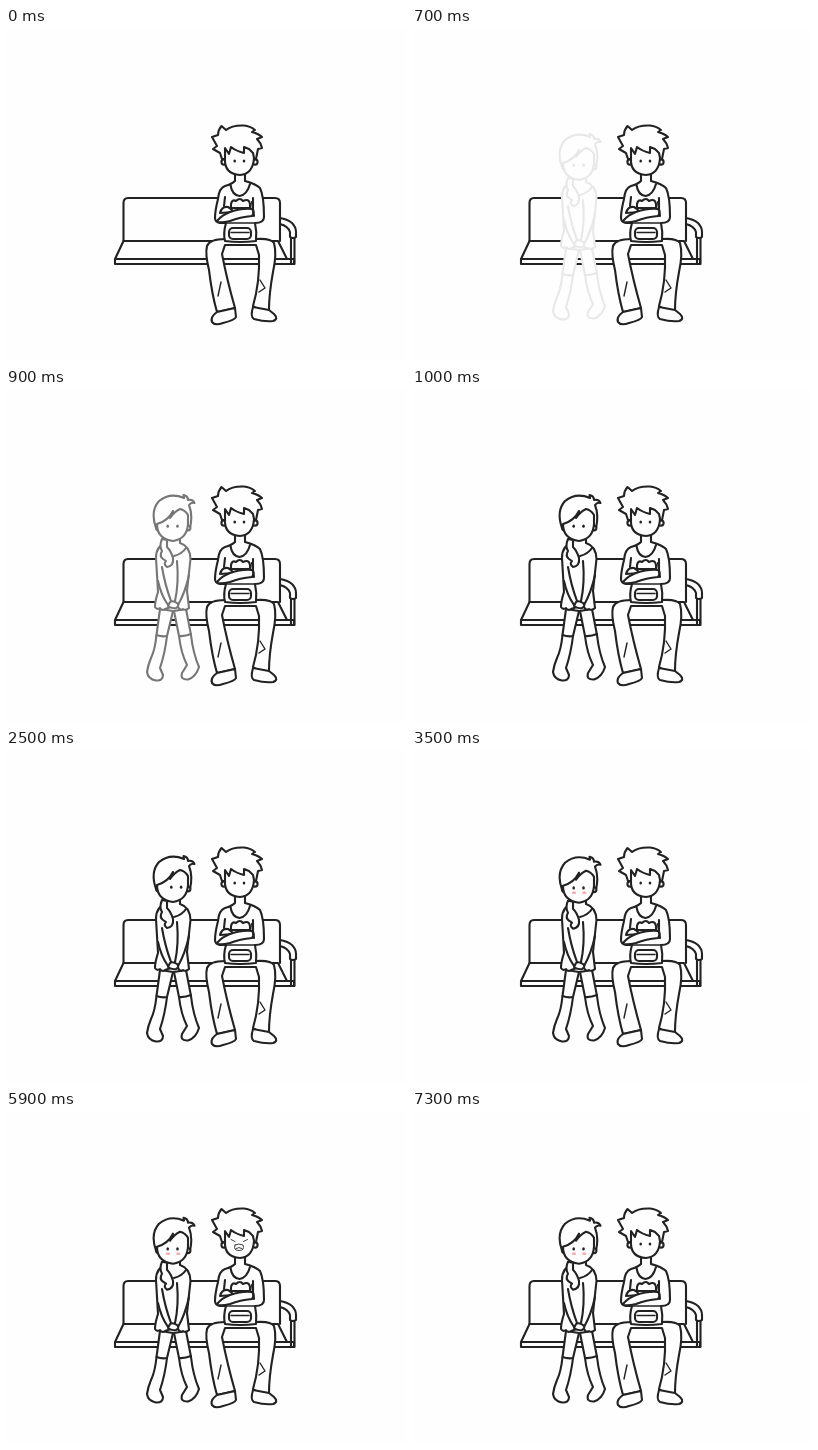
These frames come from a looping animation (400 px wide and 333 px high, 8 s). An HTML page:

```html
<!DOCTYPE html>
<html lang="en">
<head>
<meta charset="utf-8">
<title>Two on a bench</title>
<style>
  html, body { margin: 0; width: 100%; height: 100%; overflow: hidden; background: #fefefe; }
  svg { display: block; width: 100vw; height: 100vh; }
  .ink { fill: none; stroke: #222; stroke-width: 2.1; stroke-linecap: round; stroke-linejoin: round; }
  .solid { fill: #fefefe; }
  .thin { stroke-width: 1.4; }
  .fine { stroke: #444; stroke-width: 1; }
  .dot { fill: #222; stroke: none; }
  .blush { fill: #f9a9a9; stroke: none; }
</style>
</head>
<body>
<svg viewBox="0 0 400 333">
  <g class="ink" id="bench">
    <path d="M117.500 213V175Q117.500 170 122 170H269Q274 170 274 175V213"/>
    <path d="M117.500 213H272L281 231M117.500 213L109 231V236H288V231H109"/>
    <path d="M274 190Q281 191 286 195Q290 199 290 204V209Q287 211 284 209V204Q282 198 274 196"/>
    <path d="M285 210V236M288.500 210V236"/>
  </g>

  <g class="ink" id="girl">
    <path class="solid" d="M154 220L150.500 246Q149 261 145 269Q142 276 141 283Q142 290 150 291.500Q157 292 157 286L154 279Q159 264 161 247L167 222Z"/>
    <path class="solid" d="M168 222L173 247Q175 264 181 276L176 284Q174 291 182 290.500Q190 288 193 278Q187 264 185 246L180 220Z"/>
    <path d="M150.500 246Q156 248 161 247M173 247Q179 247.500 185 245"/>
    <path class="solid" d="M161 150V154Q150 156 150 169L152 203Q149 212 149 218Q151 221 154 219Q156 222 159 220L165 218H172Q174 222 177 220Q180 222 183 219Q182 210 181 202L184.500 170Q184 157 174 154V150Z"/>
    <path d="M156 178Q159 196 165 212M152 192Q155 206 162 216M171 172Q173 194 169 212M183 186Q179 204 172 216"/>
    <path class="solid" d="M164 213Q167 211 171 214Q174 217 170 219Q166 220 162 217Z"/>
    <path d="M168 167Q176 165 180 159"/>
    <g id="girlHead">
      <path class="solid" d="M156 150Q153 157 156 162Q153 167 157 170L160 172Q157 175 161 178Q168 177 167 169Q165 162 161 158V151Z"/>
      <path class="solid" d="M150 139Q144 122 153 112Q164 103 178 109L177.500 106Q182 107 182 111Q187 110 188.500 114Q185 113 183 116Q187 126 184 139Z"/>
      <circle class="solid" cx="152.500" cy="139" r="2.4"/>
      <circle class="solid" cx="182" cy="139" r="2.4"/>
      <path class="solid" d="M151 135Q151 150 167 152Q181 150 182 135L182 126Q179 121 174 120Q168 123 164 129L167 122Q162 132 151 135Z"/>
      <g id="girlEyes">
        <ellipse class="dot" cx="161.700" cy="137.200" rx="1.3" ry="1.6"/>
        <ellipse class="dot" cx="171.500" cy="137.200" rx="1.3" ry="1.6"/>
      </g>
      <g id="blush">
        <ellipse class="blush" cx="162" cy="142" rx="2.2" ry="1.2"/>
        <ellipse class="blush" cx="172.300" cy="142" rx="2.2" ry="1.2"/>
      </g>
    </g>
  </g>

  <g class="ink" id="boy">
    <path class="solid" d="M219 211Q204 211 201 218Q199 226 203 242Q206 267 211 284L229 280Q221 252 216 226L219 217H250L253 227Q254 254 247 278Q254 283 263 282Q263 266 267 244Q271 226 268 215Q265 210 250 211Z"/>
    <path class="solid" d="M211 284Q204 289 206 294Q209 298 217 295Q229 292 230 289L229 280Z"/>
    <path class="solid" d="M247 279Q244 289 248 291Q259 294 267 293Q273 291 268 286L263 282Z"/>
    <path class="thin" d="M215 254L212 268M254 252L259 260L253 264"/>
    <path class="solid" d="M229 145V153Q226 156 219 158Q213 160 212 171Q209 183 209 190Q209 194 214 195L220 195Q217 205 219 213Q234 215 250 213Q251 204 249 195Q258 195 258 189Q258 168 254 160Q250 156 239 153V145Z"/>
    <path d="M224.500 157Q226 167 233.500 168Q241 167 244 156M219 169L218 178M247 170V180"/>
    <path class="solid" d="M225 180V176Q226 171 230 173Q234 169 237 173Q243 170 244 176V180Z"/>
    <path class="solid" d="M214 185Q216 178 222 179Q226 181 227 184Z"/>
    <path class="solid" d="M211 193Q216 187 224 184Q236 180 246 181Q249 184 246 188Q234 189 224 193Q216 195 212 194"/>
    <path d="M246 174L248 188"/>
    <rect class="solid" x="223" y="200" width="22" height="11" rx="4"/>
    <path class="thin" d="M225 204.500H243M220 195H249"/>
    <path class="solid" d="M216 131L214 125L207 121L211 118L206 109L212 107Q212 102 215.500 98L220 102Q226 97 238 97.500Q244 98 249 102L246 104Q253 106 256 109L251 111Q255 115 256 120L252 121L250 131Z"/>
    <circle class="solid" cx="218" cy="134" r="2.6"/>
    <circle class="solid" cx="249" cy="134" r="2.6"/>
    <path class="solid" d="M219 130Q218 146 234 147Q247 146 248 130L247 125L243 121L238 119L238 125Q230 123 225 119L223 126L219 120Z"/>
    <g id="boyEyes">
      <ellipse class="dot" cx="228.700" cy="133" rx="1.3" ry="1.6"/>
      <ellipse class="dot" cx="238" cy="133" rx="1.3" ry="1.6"/>
    </g>
    <g id="yawn">
      <path class="fine" d="M225 128.500L229 130.500M237.500 130.500L241.500 128.500"/>
      <path class="fine" id="mouth"/>
    </g>
  </g>
</svg>
<script>
const LOOP = 8000;
const el = id => document.getElementById(id);
const show = (id, on) => el(id).setAttribute('display', on ? 'inline' : 'none');
const move = (id, x, y) => el(id).setAttribute('transform', `translate(${x} ${y})`);

// Value of the latest [start, value] step reached at time t.
const stepAt = (t, steps) => steps.reduce((v, [start, next]) => t >= start ? next : v, 0);

function mouthPath(height) {
  const top = 133, bottom = top + height;
  return `M229 ${top + 1}Q233 ${top - 1} 237 ${top + 1}Q239 ${bottom} 233 ${bottom}Q227 ${bottom} 229 ${top + 1}Z`
    + `M230 ${bottom - 2}Q233 ${bottom - 4} 236 ${bottom - 2}`;
}

function render(t) {
  const fade = stepAt(t, [[700, .1], [800, .28], [900, .62], [1000, 1]]);
  const shade = Math.round(254 - 220 * fade);
  show('girl', fade > 0);
  el('girl').style.stroke = `rgb(${shade},${shade},${shade})`;
  el('girlEyes').style.opacity = fade;

  const shy = t >= 3500;
  move('girlHead', 0, shy ? .7 : 0);
  move('girlEyes', shy ? 0 : stepAt(t, [[2000, 1.8], [2500, 3.6]]), 0);
  show('blush', shy);

  const yawning = t >= 5100 && t < 6800;
  show('yawn', yawning);
  show('boyEyes', !yawning);
  move('boyEyes', t >= 4500 && t < 7300 ? -1.4 : 0, 0);
  const beat = Math.min(5, Math.floor((t - 5100) / 200));
  el('mouth').setAttribute('d', mouthPath(beat % 2 ? 8 : 6.5));
}

const start = performance.now();
function tick() {
  render((performance.now() - start) % LOOP);
  requestAnimationFrame(tick);
}
tick();
</script>
</body>
</html>
```
